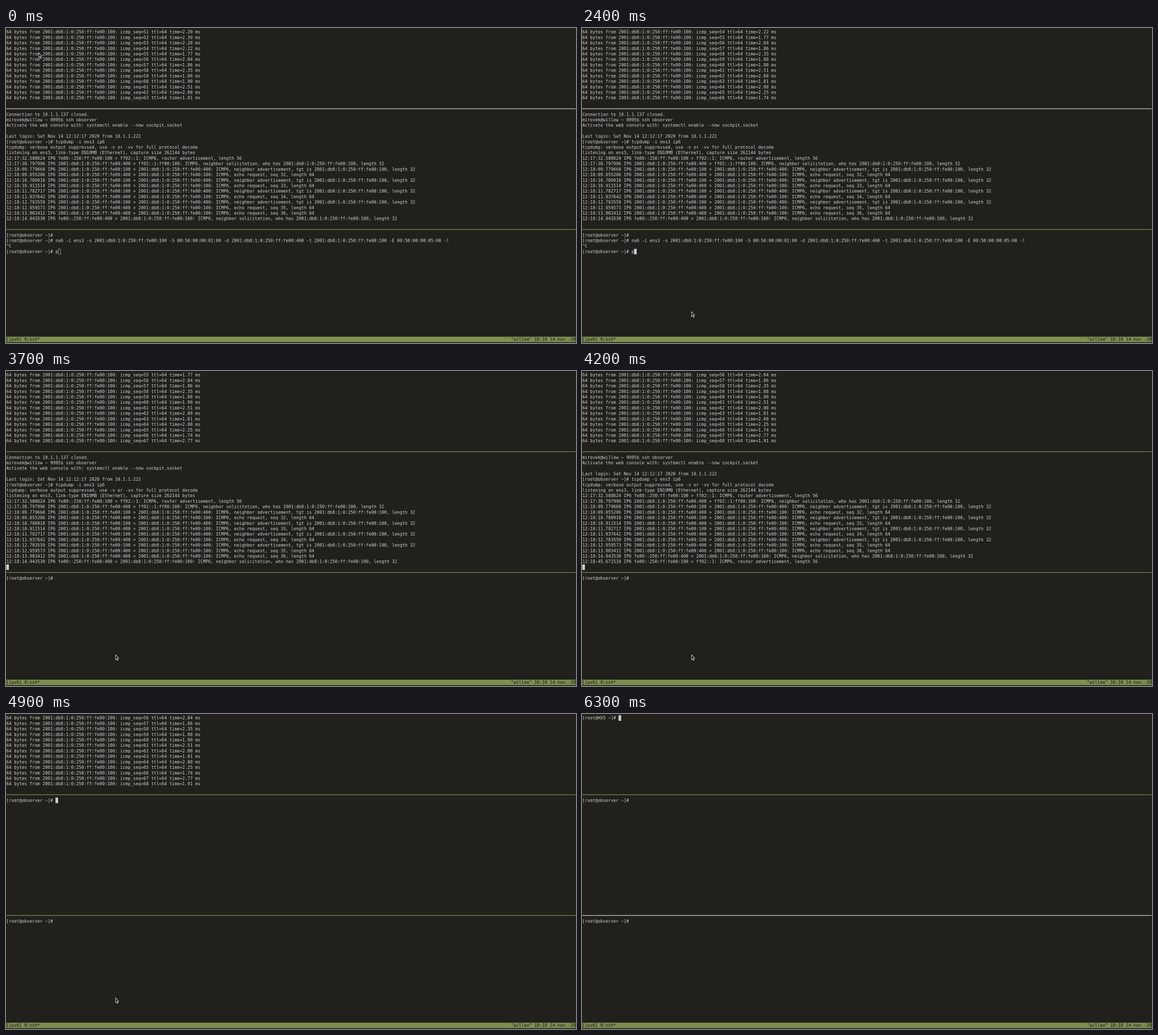
An HTML page with a canvas for the animation above (8 s loop, 1006 px wide and 557 px high).

```html
<!DOCTYPE html>
<html lang="en">
<head>
<meta charset="utf-8">
<title>Terminal session</title>
<style>
html, body { margin: 0; width: 1006px; height: 557px; overflow: hidden; background: #21201c; }
canvas { display: block; width: 1006px; height: 557px; }
</style>
</head>
<body>
<canvas id="screen" width="2012" height="1114"></canvas>
<script>
const ctx = document.getElementById('screen').getContext('2d');
const BG = '#21201c', FG = '#d0d0d0', GREEN = '#7e8e50';
const LOOP = 8000, COLS = 220, CW = 8, CH = 17, PAD_X = 1, PAD_Y = 4;
const SCALE = 2012 / (COLS * CW + 2 * PAD_X);

const prompt = '[root@observer ~]# ';
const net = '2001:db8:1:0:250:ff:fe00:';
const victim = net + '100', peer = net + '400';

// Top pane: ping replies
const pingTimes = [500, 1400, 2200, 3200, 4200, 5200];
const rtts = ('2.20 2.39 2.20 2.22 1.77 2.84 1.86 2.35 1.88 1.90 2.51 2.08 1.81 ' +
  '2.08 2.25 1.74 2.77 1.91 2.14').split(' ');
const replies = rtts.map((ms, i) =>
  `64 bytes from ${victim}: icmp_seq=${51 + i} ttl=64 time=${ms} ms`);
const pingStats = ['^C', `--- ${victim} ping statistics ---`,
  '69 packets transmitted, 69 received, 0% packet loss, time 68151ms',
  'rtt min/avg/max/mdev = 1.743/2.147/2.842/0.301 ms'];
const topPrompt = '[root@HX5 ~]# ';

// Middle pane: packet capture
const packet = (time, from, to, info, len) =>
  `12:${time} IP6 ${from} > ${to}: ICMP6, ${info}, length ${len}`;
const router = time => packet(time, 'fe80::250:ff:fe00:100', 'ff02::1', 'router advertisement', 56);
const solicit = (time, from, to) =>
  packet(time, from, to, `neighbor solicitation, who has ${victim}`, 32);
const advert = time => packet(time, victim, peer, `neighbor advertisement, tgt is ${victim}`, 32);
const echo = (time, seq) => packet(time, peer, victim, `echo request, seq ${seq}`, 64);

const capture = [
  'Connection to 10.1.1.137 closed.',
  'mirovek@willow ~ 9995$ ssh observer',
  'Activate the web console with: systemctl enable --now cockpit.socket',
  '',
  'Last login: Sat Nov 14 12:12:17 2020 from 10.1.1.222',
  prompt + 'tcpdump -i ens3 ip6',
  'tcpdump: verbose output suppressed, use -v or -vv for full protocol decode',
  'listening on ens3, link-type EN10MB (Ethernet), capture size 262144 bytes',
  router('17:32.508624'),
  solicit('17:38.797996', peer, 'ff02::1:ff00:100'),
  advert('18:09.779668'), echo('18:09.855206', 32),
  advert('18:10.780918'), echo('18:10.911514', 33),
  advert('18:11.782717'), echo('18:11.937642', 34),
  advert('18:12.783559'), echo('18:12.959573', 35),
  echo('18:13.983412', 36),
  solicit('18:14.943530', 'fe80::250:ff:fe00:400', victim)
];
const captureStats = ['^C', '13 packets captured', '13 packets received by filter',
  '0 packets dropped by kernel'];

// Bottom pane: shell
const history = [prompt,
  `${prompt}na6 -i ens3 -s ${victim} -S 00:50:00:00:01:00 -d ${peer} -t ${victim} -E 00:50:00:00:05:00 -l`,
  '^C'];

function topLines(t) {
  if (t >= 6300) return [topPrompt];
  const shown = replies.slice(0, 13 + pingTimes.filter(p => t >= p).length);
  return t >= 5900 ? [...shown, ...pingStats, topPrompt] : [...shown, ''];
}

function middleLines(t) {
  if (t >= 4900) return [prompt];
  const lines = t >= 3800 ? [...capture, router('18:45.671510')] : capture;
  return t >= 4700 ? [...lines, ...captureStats, prompt] : [...lines, ''];
}

function bottomLines(t) {
  return t >= 3100 ? [prompt] : [...history, prompt + (t < 3000 ? 'p' : '')];
}

function mousePos(t) {
  if (t < 1900) return [57.5, 43];
  if (t < 2000) return [75, 85];
  if (t < 2100) return [125, 260];
  if (t < 2200) return [170, 425];
  if (t < 2400) return [190, 494];
  return [193, 501];
}

const cellX = col => PAD_X + col * CW;
const cellY = row => PAD_Y + row * CH;

function write(text, col, row, color) {
  ctx.fillStyle = color;
  [...text].forEach((ch, i) => {
    if (ch !== ' ') ctx.fillText(ch, cellX(col + i), cellY(row) + 13);
  });
}

function pane(lines, top, height, active, hollow) {
  const shown = lines.slice(-height);
  shown.forEach((line, i) => write(line, 0, top + i, FG));
  if (!active) return;
  const x = cellX(shown.at(-1).length), y = cellY(top + shown.length - 1);
  ctx.fillStyle = ctx.strokeStyle = FG;
  if (hollow) ctx.strokeRect(x + .5, y + .5, CW - 1, CH - 1);
  else ctx.fillRect(x, y, CW, CH);
}

function separator(row, active) {
  ctx.fillStyle = active ? GREEN : FG;
  ctx.fillRect(cellX(0), cellY(row) + 7, COLS * CW, 2);
}

function mouse([x, y]) {
  ctx.setTransform(2, 0, 0, 2, 2 * x, 2 * y);
  const shape = new Path2D('M.4 .8V9.3L2.3 7.6L3.8 10.8L5 10.2L3.5 7.1L5.9 6.7Z');
  ctx.fillStyle = '#111';
  ctx.strokeStyle = '#e8e8e8';
  ctx.lineWidth = .75;
  ctx.fill(shape);
  ctx.stroke(shape);
}

function draw(t) {
  const active = t < 3700 ? 2 : t < 5900 ? 1 : 0;
  ctx.setTransform(1, 0, 0, 1, 0, 0);
  ctx.fillStyle = BG;
  ctx.fillRect(0, 0, 2012, 1114);
  ctx.setTransform(SCALE, 0, 0, SCALE, 0, 0);
  ctx.font = '13.3px "DejaVu Sans Mono", monospace';
  ctx.lineWidth = 1;

  pane(topLines(t), 0, 14, active === 0);
  separator(14, active < 2);
  pane(middleLines(t), 15, 21, active === 1);
  separator(36, active > 0);
  pane(bottomLines(t), 37, 19, active === 2, t < 2400);

  ctx.fillStyle = GREEN;
  ctx.fillRect(cellX(0), cellY(56), COLS * CW, CH);
  write('[ipv6] 0:ssh*', 0, 56, '#151515');
  write('"willow" 18:18 14-nov.-20', 195, 56, '#151515');
  if (t < 5900) mouse(mousePos(t));
}

// The picture only changes at these moments
const cuts = [0, 500, 1400, 1900, 2000, 2100, 2200, 2400, 3000, 3100, 3200,
  3700, 3800, 4200, 4700, 4900, 5200, 5900, 6300];
const start = performance.now();
let current = -1;

function tick() {
  const t = (performance.now() - start) % LOOP;
  const cut = cuts.findLast(c => t >= c);
  if (cut !== current) draw(current = cut);
  requestAnimationFrame(tick);
}
tick();
</script>
</body>
</html>
```
